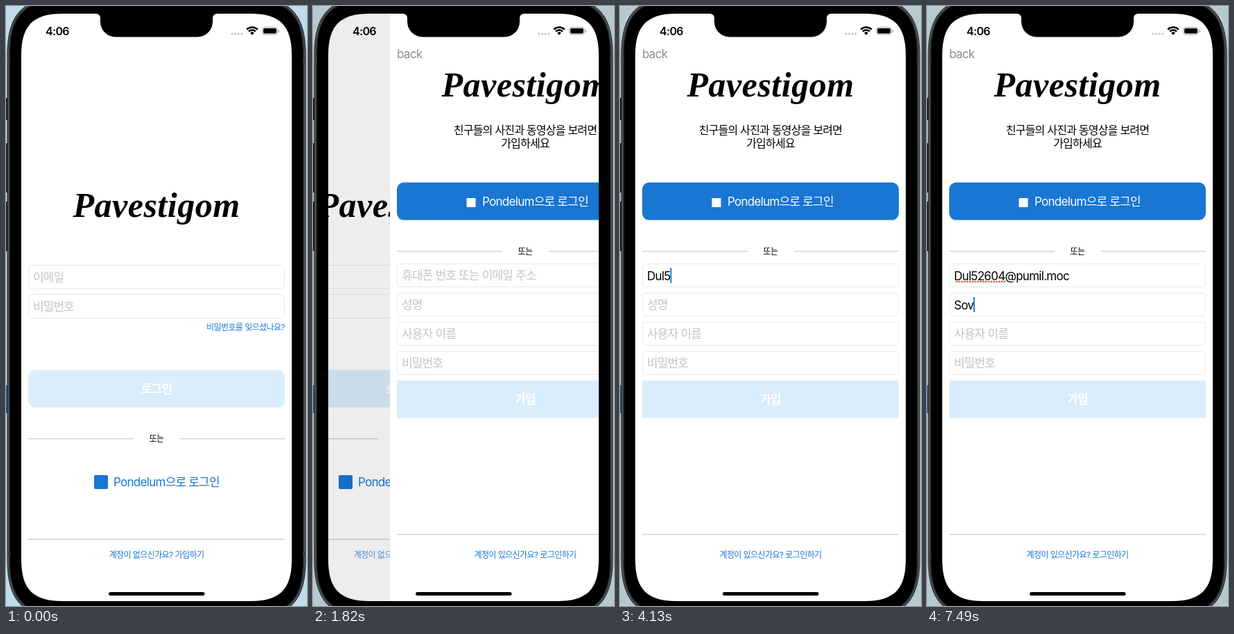
Animation, 434 px wide and 862 px high, one loop 8 s. Source, as an HTML page with a canvas:

```html
<!DOCTYPE html>
<html lang="ko">
<head>
<meta charset="utf-8">
<title>Sign up</title>
<style>
html, body { margin: 0; width: 100%; height: 100%; overflow: hidden; background: #000; }
canvas { display: block; width: 434px; height: 862px; }
</style>
</head>
<body>
<canvas id="stage" width="434" height="862"></canvas>
<script>
const ctx = document.getElementById('stage').getContext('2d');
const LOOP = 8000, STEP = 70;
const BLUE = '#1976d2', PALE = '#d9edfc', HINT = '#c4c4c6', LINE = '#d3d3d6';
const SANS = 'Inter, "Noto Sans CJK KR", "Noto Sans CJK JP", sans-serif';
const BRAND = 'Pavestigom', SOCIAL = 'Pondelum으로 로그인';

const SCREEN = { x: 22, y: 11, w: 390, h: 844 };
const PUSH_AT = 1660, FOCUS_AT = 2800, NEXT_AT = 6860;
const EMAIL = 'Dul52604@pumil.moc', NAME = 'Sov';
const EMAIL_KEYS = [2870, 3710, 3850, 4130, 4200, 4340, 4480, 4550, 4830,
  5040, 5250, 5390, 5530, 5740, 6160, 6300, 6510, 6650];
const NAME_KEYS = [7210, 7280, 7490];

const clamp = v => Math.max(0, Math.min(1, v));
const mix = (a, b, k) => `rgb(${a.map((v, i) => Math.round(v + (b[i] - v) * k))})`;
const typed = (s, keys, t) => s.slice(0, keys.filter(k => k <= t).length);

function rect(x, y, w, h, color, r = 0) {
  ctx.fillStyle = color;
  ctx.beginPath();
  ctx.roundRect(x, y, w, h, r);
  ctx.fill();
}

function outline(x, y, w, h, color, r, width = 1) {
  ctx.strokeStyle = color;
  ctx.lineWidth = width;
  ctx.beginPath();
  ctx.roundRect(x, y, w, h, r);
  ctx.stroke();
}

// Box with continuous-curvature corners, as wide as a circle of radius r at the diagonal.
function smoothBox(x, y, w, h, r) {
  const e = r * 1.277, c = e * 0.283, R = x + w, B = y + h;
  const p = new Path2D();
  p.moveTo(x + e, y);
  p.lineTo(R - e, y);
  p.bezierCurveTo(R - c, y, R, y + c, R, y + e);
  p.lineTo(R, B - e);
  p.bezierCurveTo(R, B - c, R - c, B, R - e, B);
  p.lineTo(x + e, B);
  p.bezierCurveTo(x + c, B, x, B - c, x, B - e);
  p.lineTo(x, y + e);
  p.bezierCurveTo(x, y + c, x + c, y, x + e, y);
  return p;
}

function dot(x, y, r, color) {
  ctx.fillStyle = color;
  ctx.beginPath();
  ctx.arc(x, y, r, 0, 7);
  ctx.fill();
}

// Hangul and Latin runs carry their own tracking; y is the middle of the capitals.
function text(s, x, y, size, { color = '#000', weight = 400, align = 0, draw = true } = {}) {
  ctx.font = `${weight} ${size}px ${SANS}`;
  ctx.textAlign = 'left';
  const runs = (s.match(/[가-힣]+|[^가-힣]+/g) || []).map(str => {
    const gap = size * (/[가-힣]/.test(str) ? -0.05 : -0.042) + 'px';
    ctx.letterSpacing = gap;
    return { str, gap, w: ctx.measureText(str).width };
  });
  const total = runs.reduce((sum, r) => sum + r.w, 0);
  if (!draw) return total;
  ctx.fillStyle = color;
  let cx = x - total * align;
  for (const r of runs) {
    ctx.letterSpacing = r.gap;
    ctx.fillText(r.str, cx, y + size * 0.37);
    cx += r.w;
  }
  return total;
}

const center = (s, y, size, opt) => text(s, 217, y, size, { align: 0.5, ...opt });

function logo(base) {
  ctx.font = 'italic bold 50px "Liberation Serif", "Times New Roman", serif';
  ctx.letterSpacing = '0.5px';
  ctx.textAlign = 'center';
  ctx.fillStyle = '#000';
  ctx.fillText(BRAND, 217, base);
}

function divider(y) {
  rect(32, y - 0.8, 152, 1.6, LINE);
  rect(251, y - 0.8, 151, 1.6, LINE);
  center('또는', y, 12);
}

function field(top, h, hint, value = '') {
  outline(32.5, top + 0.5, 369, h - 1, '#e9e9ec', 5);
  const y = top + h / 2;
  if (value) text(value, 39, y + 0.3, 17);
  else text(hint, 39, y, 17, { color: HINT });
}

function caret(value, y, alpha) {
  const x = 39 + text(value, 0, 0, 17, { draw: false });
  ctx.globalAlpha = alpha;
  rect(x - 0.3, y - 11, 2, 22, BLUE, 1);
  ctx.globalAlpha = 1;
}

function loginPage(t) {
  rect(22, 11, 390, 844, '#fff');
  logo(303);
  field(372, 35, '이메일');
  field(414, 35, '비밀번호');
  text('비밀번호를 잊으셨나요?', 402, 462, 12, { color: BLUE, align: 1 });
  rect(32, 522.7, 370, 54, PALE, 10);
  center('로그인', 549.5, 17, { color: '#fff', weight: 700 });
  divider(621.8);
  rect(127, 674, 20, 20, BLUE, 2);
  text(SOCIAL, 155, 684, 17, { color: BLUE });
  rect(32, 765.5, 370, 1.6, LINE);
  ctx.globalAlpha = t < 1610 ? 1 : 0.2 + 0.8 * clamp((t - 1640) / 260);
  center('계정이 없으신가요? 가입하기', 788.5, 12, { color: BLUE });
  ctx.globalAlpha = 1;
}

function signupPage(t) {
  const email = typed(EMAIL, EMAIL_KEYS, t), name = typed(NAME, NAME_KEYS, t);
  rect(22, 11, 390, 844, '#fff');
  text('back', 32, 68.5, 17, { color: '#8e8e93' });
  logo(130);
  center('친구들의 사진과 동영상을 보려면', 178.3, 16);
  center('가입하세요', 197.5, 16);
  rect(32, 253.6, 370, 54, BLUE, 10);
  rect(132.5, 276, 13, 13, '#fff');
  text(SOCIAL, 155, 280.7, 17, { color: '#fff' });
  divider(352.5);
  field(370, 34, '휴대폰 번호 또는 이메일 주소', email);
  field(412, 34, '성명', name);
  field(454, 34, '사용자 이름');
  field(496, 34, '비밀번호');
  rect(32, 538, 370, 54, PALE);
  center('가입', 565, 17, { color: '#fff', weight: 700 });
  rect(32, 758.4, 370, 1.6, LINE);
  center('계정이 있으신가요? 로그인하기', 788.5, 12, { color: BLUE });

  if (t >= EMAIL_KEYS[8]) {
    const end = 39 + text(EMAIL.slice(0, 8), 0, 0, 17, { draw: false });
    for (let x = 42.5; x < end; x += 3.85) dot(x, 396, 1.35, '#f2453d');
  }
  if (t >= NEXT_AT) caret(name, 429, 1);
  else if (t >= FOCUS_AT) {
    const blink = t < EMAIL_KEYS[1] ? 1 - clamp((t - 3360) / 210) : 1;
    caret(email, 387, blink);
  }
}

function pages(t) {
  const x = Math.max(0, t - PUSH_AT) / 1000 * 17.6;
  const p = t >= 2240 ? 1 : 1 - (1 + x) * Math.exp(-x);
  ctx.save();
  ctx.clip(smoothBox(SCREEN.x, SCREEN.y, SCREEN.w, SCREEN.h, 47));
  if (p < 1) {
    ctx.save();
    ctx.translate(Math.round(-117 * p), 0);
    loginPage(t);
    ctx.restore();
    rect(22, 11, 390, 844, `rgba(0,0,0,${0.09 * p})`);
  }
  if (p > 0) {
    ctx.translate(Math.round(SCREEN.w * (1 - p)), 0);
    signupPage(t);
  }
  ctx.restore();
}

function device(t) {
  const k = clamp(t / 490);
  rect(0, 0, 434, 862, mix([190, 220, 233], [182, 200, 208], k));
  rect(0, 545, 3, 40, mix([22, 100, 200], [35, 95, 170], k));
  for (const [y, h] of [[132, 32], [197, 71], [281, 71]]) rect(0, y, 3, h, '#1c1e20');
  const layer = (inset, color) => {
    ctx.fillStyle = color;
    ctx.fill(smoothBox(1.5 + inset, -13 + inset, 431 - 2 * inset, 892 - 2 * inset, 65 - inset));
  };
  layer(0, '#2a2d2f');
  layer(1.5, '#63686b');
  layer(2.5, '#2a2d2f');
  for (const y of [76, 784]) {
    rect(2, y, 4, 6, '#3c4043');
    rect(428, y, 4, 6, '#3c4043');
  }
  layer(4.5, '#000');
}

function notch() {
  ctx.fillStyle = '#000';
  ctx.beginPath();
  ctx.moveTo(129, 10);
  ctx.lineTo(129, 11);
  ctx.quadraticCurveTo(136, 11, 136, 18);
  ctx.arcTo(136, 44.5, 160, 44.5, 22);
  ctx.arcTo(298, 44.5, 298, 18, 22);
  ctx.lineTo(298, 18);
  ctx.quadraticCurveTo(298, 11, 305, 11);
  ctx.lineTo(305, 10);
  ctx.fill();
}

function statusBar() {
  text('4:06', 57, 36, 16, { weight: 600 });
  for (let i = 0; i < 4; i++) dot(326 + i * 4.6, 40, 1.6, '#c4c4c6');
  ctx.strokeStyle = '#000';
  ctx.lineWidth = 2.6;
  for (const r of [7, 11]) {
    ctx.beginPath();
    ctx.arc(355, 41.5, r, -Math.PI * 0.75, -Math.PI * 0.25);
    ctx.stroke();
  }
  ctx.fillStyle = '#000';
  ctx.beginPath();
  ctx.moveTo(355, 41.8);
  ctx.arc(355, 41.5, 4, -Math.PI * 0.75, -Math.PI * 0.25);
  ctx.fill();
  outline(369.5, 30.5, 22, 10.5, '#a5a5a7', 3.4);
  rect(371, 32, 19, 7.5, '#000', 2);
  rect(392.5, 34, 1.4, 4, '#a5a5a7', 0.7);
  rect(148, 842, 138.5, 5, '#000', 2.5);
}

function frame() {
  const t = Math.floor((performance.now() % LOOP) / STEP) * STEP;
  device(t);
  pages(t);
  notch();
  statusBar();
  requestAnimationFrame(frame);
}
frame();
</script>
</body>
</html>
```
